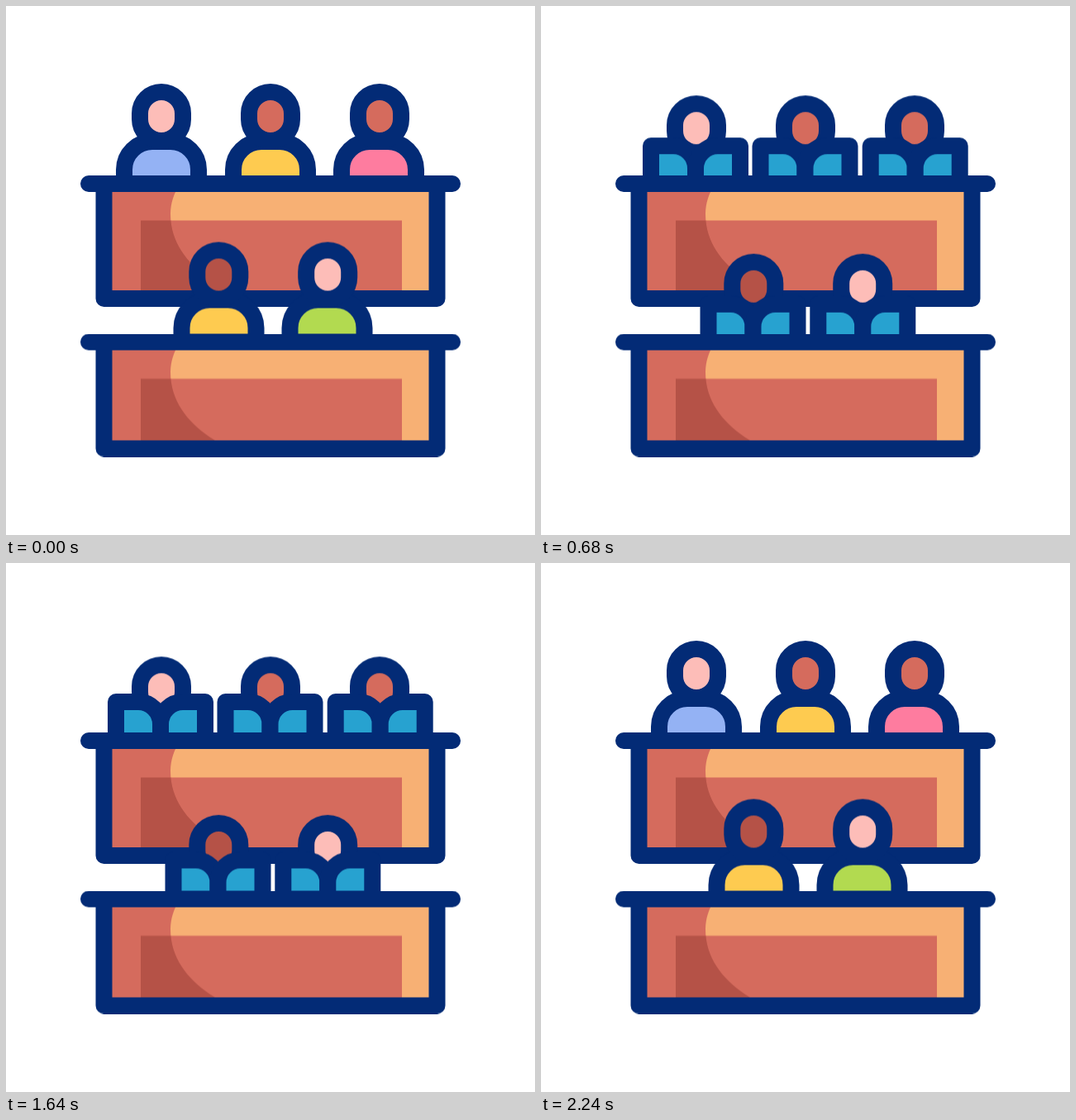
An HTML page for the animation above (2600 ms loop, 640x640 px).

```html
<!DOCTYPE html>
<html lang="en">
<head>
<meta charset="utf-8">
<title>Readers at desks</title>
<style>
  html, body { margin: 0; width: 100%; height: 100%; overflow: hidden; background: #fff; }
  svg { display: block; width: 100vw; height: 100vh; }
  .ink { stroke: #032b76; stroke-width: 20; stroke-linecap: round; stroke-linejoin: round; }
</style>
</head>
<body>
<svg id="stage" viewBox="0 0 640 640"></svg>
<script>
const LOOP = 2600, STEP = 40;
const EASE = 'cubic-bezier(.4, 0, .2, 1)';
const HEAD_DROP = 19.5, BOOK_DROP = 50, ROW = 191.5;

const PALE = '#fdbdb8', RED = '#d56b5d', BROWN = '#b55247', SAND = '#f7b074', TEAL = '#27a2d0';
const BLUE = '#94b2f4', YELLOW = '#fecb50', PINK = '#fe7c9f', GREEN = '#b2da50';

// Each reader: body centre, head centre, book centre, face colour, shirt colour
const rows = [
  { y: 0, depth: 139, readers: [
    [188, 188, 187, PALE, BLUE],
    [320, 320, 319.5, RED, YELLOW],
    [451, 452, 452.7, RED, PINK]] },
  { y: ROW, depth: 129, readers: [
    [257.5, 257.3, 256.5, BROWN, YELLOW],
    [388.5, 389.2, 389.3, PALE, GREEN]] }
];

const person = ([body, head, , face, shirt]) => `
  <g class="person">
    <path class="ink" fill="${shirt}" d="M${body - 45} 215V198a34 34 0 0 1 34-34h22a34 34 0 0 1 34 34v17z"/>
    <rect class="ink" fill="${face}" x="${head - 26}" y="104" width="52" height="59" rx="26"/>
  </g>`;

const book = ([, , x]) => `
  <g class="book ink" fill="${TEAL}">
    <path d="M${x - 54} 215V168h27a27 27 0 0 1 27 27v20z"/>
    <path d="M${x + 54} 215V168h-27a27 27 0 0 0-27 27v20z"/>
  </g>`;

const desk = (depth, i) => {
  const box = `x="118.5" y="215" width="403" height="${depth}"`;
  const panel = `x="163" y="259.5" width="316" height="${depth - 44.5}"`;
  const curve = 'M118 215H211C203 226 199 239 199 251.5C199 286.5 220 313.5 252 333.5L275 348V360H118z';
  return `
    <clipPath id="box${i}"><rect ${box}/></clipPath>
    <clipPath id="panel${i}"><rect ${panel}/></clipPath>
    <rect ${box} fill="${SAND}"/>
    <path d="${curve}" fill="${RED}" clip-path="url(#box${i})"/>
    <rect ${panel} fill="${RED}"/>
    <path d="${curve}" fill="${BROWN}" clip-path="url(#panel${i})"/>
    <rect class="ink" ${box} fill="none"/>
    <path class="ink" d="M100 215H540"/>`;
};

const stage = document.getElementById('stage');
stage.innerHTML = rows.map(({ y, depth, readers }, i) =>
  `<g transform="translate(0 ${y})">
    ${readers.map(person).join('')}${readers.map(book).join('')}${desk(depth, i)}
  </g>`).join('');

// Table of [time in ms, vertical shift]
const moves = {
  '.person': [[0, 0], [400, 0], [1000, HEAD_DROP], [1600, HEAD_DROP], [2200, 0], [LOOP, 0]],
  '.book': [[0, BOOK_DROP], [200, BOOK_DROP], [800, 0], [1800, 0], [2400, BOOK_DROP], [LOOP, BOOK_DROP]]
};

const tracks = Object.entries(moves).flatMap(([name, table]) => {
  const frames = table.map(([time, y]) => ({
    offset: time / LOOP, transform: `translateY(${y}px)`, easing: EASE
  }));
  return [...stage.querySelectorAll(name)].map(el => {
    const track = el.animate(frames, { duration: LOOP, fill: 'both' });
    track.pause();
    return track;
  });
});

const start = performance.now();
function tick() {
  const time = (performance.now() - start) % LOOP;
  const held = Math.floor(time / STEP) * STEP;
  for (const track of tracks) track.currentTime = held;
  requestAnimationFrame(tick);
}
tick();
</script>
</body>
</html>
```
